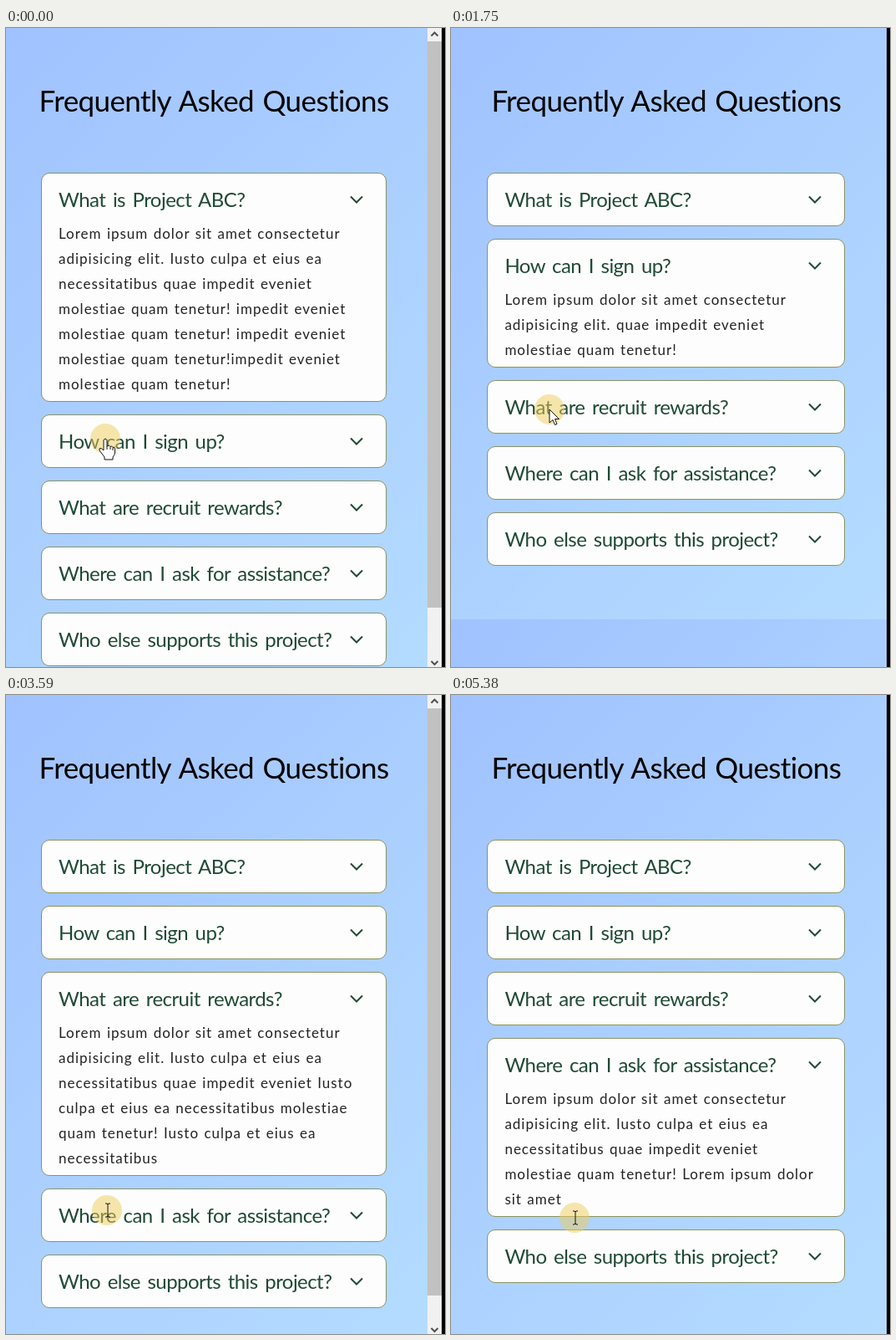
Recreate the animation shown at these times as an HTML page. Size 526 by 764 pixels, loop 5.42 s.

```html
<!DOCTYPE html>
<html lang="en">
<head>
<meta charset="utf-8">
<title>FAQ accordion</title>
<style>
  html, body { margin: 0; width: 100%; height: 100%; overflow: hidden; background: #000; }
  #stage { position: relative; width: 526px; height: 764px; overflow: hidden; font-family: Lato, "Open Sans", sans-serif; }
  #page { position: absolute; inset: 0 4px 0 0; background: linear-gradient(135deg, #a0c2ff, #abd0ff 50%, #b4dcff); }
  #list { position: absolute; top: 0; }
  h1 { position: absolute; top: 66px; left: -20px; right: -20px; margin: 0; text-align: center; white-space: nowrap;
    font-size: 35px; line-height: 41px; font-weight: 400; letter-spacing: -.6px; word-spacing: 2px; color: #000; }
  #panels { padding-top: 173px; }
  .panel { position: relative; box-sizing: border-box; margin-bottom: 15px; padding: 0 0 5px 20px;
    border: 1px solid #8a9362; border-radius: 10px; background: #fdfdfd; }
  h2 { height: 57px; margin: 0; font-size: 24px; line-height: 62px; font-weight: 400; white-space: nowrap;
    letter-spacing: -.55px; word-spacing: 3px; color: #1f4a35; }
  .answer { overflow: hidden; white-space: pre; font-size: 17px; line-height: 30px;
    letter-spacing: 1px; word-spacing: 1px; color: #222; }
  .panel svg { position: absolute; top: 25px; right: 26px; }
  svg { fill: none; overflow: visible; }
  #bar { position: absolute; left: 505px; top: 0; width: 17px; height: 764px; background: #f1f1f1; }
  #thumb { position: absolute; top: 16px; width: 17px; background: #c1c1c1; }
  #bar svg { position: absolute; left: 0; top: 0; }
  #pointer { position: absolute; left: 0; top: 0; }
</style>
</head>
<body>
<div id="stage">
  <div id="page"></div>
  <div id="list"><h1>Frequently Asked Questions</h1><div id="panels"></div></div>
  <div id="bar">
    <div id="thumb"></div>
    <svg width="17" height="764" stroke="#505050" stroke-width="2"><path d="M4.5 9.5l4-4 4 4M4.5 757l4 4 4-4"/></svg>
  </div>
  <svg id="pointer" width="1" height="1">
    <circle r="18" fill="#f0cd5a" fill-opacity=".5"/>
    <circle id="dot" r="5" fill="#f0604a"/>
    <path id="shape" stroke="#111" stroke-linejoin="round"/>
  </svg>
</div>
<script>
const LOOP = 5420, REACH = 260, FADE = 1000;
const CLOSED_HEIGHT = 617, VIEW_HEIGHT = 768;
const $ = id => document.getElementById(id);

const faq = [
  ["What is Project ABC?", [
    "Lorem ipsum dolor sit amet consectetur", "adipisicing elit. Iusto culpa et eius ea",
    "necessitatibus quae impedit eveniet", "molestiae quam tenetur! impedit eveniet",
    "molestiae quam tenetur! impedit eveniet", "molestiae quam tenetur!impedit eveniet",
    "molestiae quam tenetur!"]],
  ["How can I sign up?", [
    "Lorem ipsum dolor sit amet consectetur", "adipisicing elit. quae impedit eveniet",
    "molestiae quam tenetur!"]],
  ["What are recruit rewards?", [
    "Lorem ipsum dolor sit amet consectetur", "adipisicing elit. Iusto culpa et eius ea",
    "necessitatibus quae impedit eveniet Iusto", "culpa et eius ea necessitatibus molestiae",
    "quam tenetur! Iusto culpa et eius ea", "necessitatibus"]],
  ["Where can I ask for assistance?", [
    "Lorem ipsum dolor sit amet consectetur", "adipisicing elit. Iusto culpa et eius ea",
    "necessitatibus quae impedit eveniet", "molestiae quam tenetur! Lorem ipsum dolor", "sit amet"]],
  ["Who else supports this project?", []]
];

// Panel i opens at opens[i] and closes when the next one opens.
const opens = [-1e4, 590, 2233, 4150, 1e4, 2e4];
const clicks = [[590, 790], [2233, 2430], [4150, 4590]];

// time, x, y
const path = [
  [0, 119, 491], [40, 119, 491], [170, 118, 487], [500, 118, 487], [880, 118, 471],
  [1750, 118, 456], [2000, 118, 454], [2250, 118, 454], [2710, 123, 570],
  [3590, 121, 616], [4000, 124, 642], [4500, 124, 656], [5380, 148, 625], [LOOP, 148, 625]
];

const shapes = {
  hand: "M-2 1.5Q0-1.5 2 1.5V9Q5 7 6 9.5Q8 8 9 10.5Q11.5 10 11.5 12.5V17Q11 20 9 22V25H-1V22L-7 14Q-8 11-5 11.5L-2 14ZM2 9v4M6 10v3M9 11v3",
  arrow: "M0 0V16L4 12.5L6.5 18.5L9 17.5L6.5 11.5H11.5Z",
  beam: "M-2-8H0L1-7L2-8H4M1-7V7M-2 8H0L1 7L2 8H4"
};
const shapeTimes = [
  [0, "hand"], [1300, "arrow"], [1900, "hand"], [2500, "arrow"],
  [3300, "beam"], [3750, "hand"], [4680, "beam"]
];

$("panels").innerHTML = faq.map(([question, lines]) => `<div class="panel"><h2>${question}</h2>
  <div class="answer">${lines.join("\n")}</div>
  <svg width="18" height="12" stroke="#1f4a35" stroke-width="2"><path d="M2 2.5l7 7 7-7"/></svg></div>`).join("");
const answers = [...document.querySelectorAll(".answer")];

// CSS "ease": cubic-bezier(.25, .1, .25, 1)
function ease(x) {
  if (x <= 0) return 0;
  if (x >= 1) return 1;
  const curve = (a, b, s) => 3 * a * s * (1 - s) ** 2 + 3 * b * s * s * (1 - s) + s ** 3;
  let low = 0, high = 1;
  for (let i = 0; i < 24; i++) {
    const mid = (low + high) / 2;
    if (curve(.25, .25, mid) < x) low = mid; else high = mid;
  }
  return curve(.1, 1, low);
}

function pointerAt(t) {
  const i = path.findIndex(p => p[0] > t);
  const [t0, x0, y0] = path[i - 1], [t1, x1, y1] = path[i];
  const k = (t - t0) / (t1 - t0), s = k * k * (3 - 2 * k);
  return [x0 + (x1 - x0) * s, y0 + (y1 - y0) * s];
}

function draw(t) {
  let height = CLOSED_HEIGHT;
  answers.forEach((answer, i) => {
    const room = REACH * (ease((t - opens[i]) / FADE) - ease((t - opens[i + 1]) / FADE));
    const open = Math.round(Math.min(room, 30 * faq[i][1].length));
    answer.style.height = open + "px";
    height += open;
  });

  const scrolls = height > VIEW_HEIGHT;
  $("bar").style.display = scrolls ? "" : "none";
  $("thumb").style.height = 559500 / height + "px";
  $("list").style.left = (scrolls ? 42 : 43.4) + "px";
  $("list").style.width = (scrolls ? 414 : 429) + "px";
  $("page").style.backgroundSize = `${scrolls ? 505 : 522}px ${height}px`;

  const [x, y] = pointerAt(t);
  const kind = shapeTimes.filter(s => s[0] <= t).pop()[1];
  $("pointer").style.transform = `translate(${x}px, ${y}px)`;
  $("shape").setAttribute("d", shapes[kind]);
  $("shape").setAttribute("fill", kind === "beam" ? "none" : "#fff");
  $("dot").style.display = clicks.some(([from, to]) => t >= from && t < to) ? "" : "none";
}

const start = performance.now();
function tick() {
  draw((performance.now() - start) % LOOP);
  requestAnimationFrame(tick);
}
tick();
</script>
</body>
</html>
```
